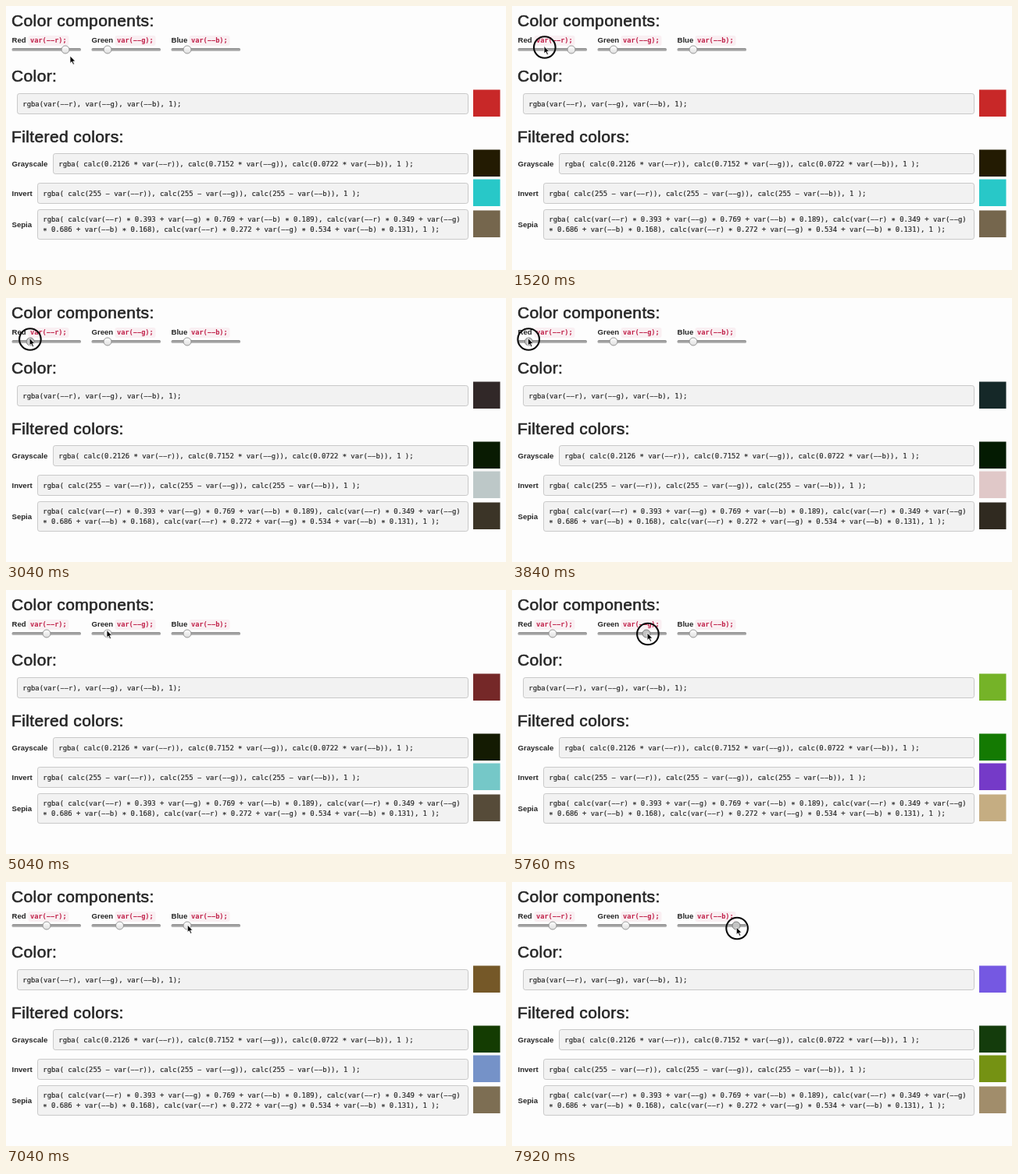
These frames come from a looping animation (640 by 339 pixels, 8000 ms). An HTML page:

```html
<!DOCTYPE html>
<html lang="en">
<head>
<meta charset="utf-8">
<title>Color components</title>
<style>
html, body { margin: 0; width: 100%; height: 100%; overflow: hidden; background: #fdfdfd; }
svg { display: block; width: 640px; height: 339px; }
text { white-space: pre; fill: #262626; }
.head { font: 21px "Liberation Sans", Arial, sans-serif; letter-spacing: .38px; stroke: #262626; stroke-width: .6px; }
.label { font: bold 9.6px "Liberation Sans", Arial, sans-serif; }
.code { font: 8.9px "DejaVu Sans Mono", monospace; stroke: #262626; stroke-width: .18px; }
.name { font: bold 8.65px "DejaVu Sans Mono", monospace; fill: #c01f48; }
.chip { fill: #f9eff2; }
.track { fill: url(#groove); }
.box { fill: #f2f2f2; stroke: #c9c9c9; }
.thumb { fill: url(#knob); stroke: #8e8e8e; stroke-width: .9; }
.thumb.active { fill: #c4c4c4; stroke: #777; }
</style>
</head>
<body>
<svg viewBox="0 0 640 339">
  <defs>
    <linearGradient id="groove" x2="0" y2="1">
      <stop stop-color="#707070"/><stop offset=".6" stop-color="#b0b0b0"/><stop offset="1" stop-color="#989898"/>
    </linearGradient>
    <linearGradient id="knob" x2="0" y2="1">
      <stop stop-color="#fff"/><stop offset="1" stop-color="#dedede"/>
    </linearGradient>
  </defs>

  <text class="head" x="7" y="26">Color components:</text>
  <text class="head" x="7" y="97">Color:</text>
  <text class="head" x="7" y="174.5">Filtered colors:</text>
  <g id="sliders"></g>
  <g id="rows"></g>

  <g id="cursor">
    <circle id="ring" cx=".8" cy="1.5" r="13.8" fill="none" stroke="#0a0a0a" stroke-width="2.1"/>
    <path d="M0 0V9.6L2.2 7.6 3.8 11.3 5.5 10.6 3.9 7H6.8Z" fill="#050505" stroke="#fff" stroke-width=".8"/>
  </g>
</svg>
<script>
const LOOP = 8000, STEP = 80, JUMP = 1840;
const GAP = 102, RANGE = 78;
const $ = id => document.getElementById(id);

const sliders = [
  { label: 'Red', code: 'var(--r);', indent: 23.5 },
  { label: 'Green', code: 'var(--g);', indent: 32.5 },
  { label: 'Blue', code: 'var(--b);', indent: 25.5 }
];
const rows = [
  { label: '', x: 14.5, mid: 125.5, lines: ['rgba(var(--r), var(--g), var(--b), 1);'] },
  { label: 'Grayscale', x: 60.5, mid: 202.5, lines: [
    'rgba( calc(0.2126 * var(--r)), calc(0.7152 * var(--g)), calc(0.0722 * var(--b)), 1 );'] },
  { label: 'Invert', x: 40.5, mid: 240.5, lines: [
    'rgba( calc(255 - var(--r)), calc(255 - var(--g)), calc(255 - var(--b)), 1 );'] },
  { label: 'Sepia', x: 40.5, mid: 280.5, lines: [
    'rgba( calc(var(--r) * 0.393 + var(--g) * 0.769 + var(--b) * 0.189), calc(var(--r) * 0.349 + var(--g)',
    '* 0.686 + var(--b) * 0.168), calc(var(--r) * 0.272 + var(--g) * 0.534 + var(--b) * 0.131), 1 );'] }
];

// Wider dashes and mid-height asterisks, as in Menlo
const mono = s => s.replace(/-/g, '\u2212')
  .replace(/\* /g, '<tspan dy="1.7">*</tspan><tspan dy="-1.7"> </tspan>');
const text = (cls, x, y, s) => `<text class="${cls}" x="${x}" y="${y}">${s}</text>`;
const rect = (cls, x, y, w, h, r) =>
  `<rect class="${cls}" x="${x}" y="${y}" width="${w}" height="${h}" rx="${r}"/>`;

$('sliders').innerHTML = sliders.map(({ label, code, indent }, i) => {
  const x = 7.5 + GAP * i;
  return rect('chip', x + indent - 2.5, 38, 52, 13, 2.7)
    + text('label', x, 47.3, label)
    + text('name', x + indent, 47.3, mono(code))
    + rect('track', x, 54.2, 88.5, 3.6, 1.5)
    + '<circle class="thumb" cy="56" r="5"/>';
}).join('');

$('rows').innerHTML = rows.map(({ label, x, mid, lines }) => {
  const extra = lines.length - 1, h = 26 + 12 * extra;
  return rect('box', x, mid - h / 2, 591.5 - x, h, 2.7)
    + text('label', 7.5, mid + 3.4, label)
    + lines.map((s, k) => text('code', x + 6.8, mid + 3 + 12.8 * (k - extra / 2), mono(s))).join('')
    + rect('swatch', 598, mid - 18, 34.5, 34.5, 0);
}).join('');

const thumbs = document.querySelectorAll('.thumb');
const swatches = document.querySelectorAll('.swatch');

// Display profile darkens the midtones
const tone = v => Math.round(255 * Math.pow(Math.min(255, Math.max(0, v)) / 255, 1.13));
const rgb = c => `rgb(${c.map(tone)})`;

function filtered(r, g, b) {
  const mix = (x, y, z) => r * x + g * y + b * z;
  return [
    [r, g, b],
    [r * .2126, g * .7152, b * .0722],
    [255 - r, 255 - g, 255 - b],
    [mix(.393, .769, .189), mix(.349, .686, .168), mix(.272, .534, .131)]
  ];
}

function draw(t) {
  const ease = (from, to) => {
    const k = Math.min(1, Math.max(0, (t - from) / (to - from)));
    return k * k * (3 - 2 * k);
  };

  const pull = -29 * ease(2640, 3600) + 39 * ease(3600, 4400);
  const red = t < JUMP ? 76 : 42 + pull;
  const green = 130 + 42 * ease(5200, 5760) - 26.5 * ease(5840, 6480);
  const blue = 232 + 55 * ease(7120, 7920);
  const xs = [red, green, blue];

  // The pointer travels between sliders and follows the held thumb
  const x = 82 - 41 * ease(480, 1440) + pull
    + 78 * ease(4560, 5040) + (green - 130) * 1.05
    + 87 * ease(6640, 7040) + blue - 232;
  const y = 64 - 12.5 * ease(480, 1440) + 3.5 * ease(5040, 5760) + 3 * ease(7040, 7920);
  const held = t >= 7120 ? 2 : t >= 5200 && t < 6560 ? 1 : t >= 1440 && t < 4480 ? 0 : -1;

  const levels = xs.map((v, i) => (v - 13 - GAP * i) / RANGE * 255);
  filtered(...levels).forEach((c, i) => swatches[i].setAttribute('fill', rgb(c)));
  thumbs.forEach((c, i) => {
    c.setAttribute('cx', xs[i]);
    c.classList.toggle('active', i === held && t >= JUMP);
  });
  $('ring').style.display = held < 0 ? 'none' : '';
  $('cursor').setAttribute('transform', `translate(${x} ${y})`);
}

const start = performance.now();
function tick() {
  const t = (performance.now() - start) % LOOP;
  draw(Math.floor(t / STEP) * STEP);
  requestAnimationFrame(tick);
}
tick();
</script>
</body>
</html>
```
